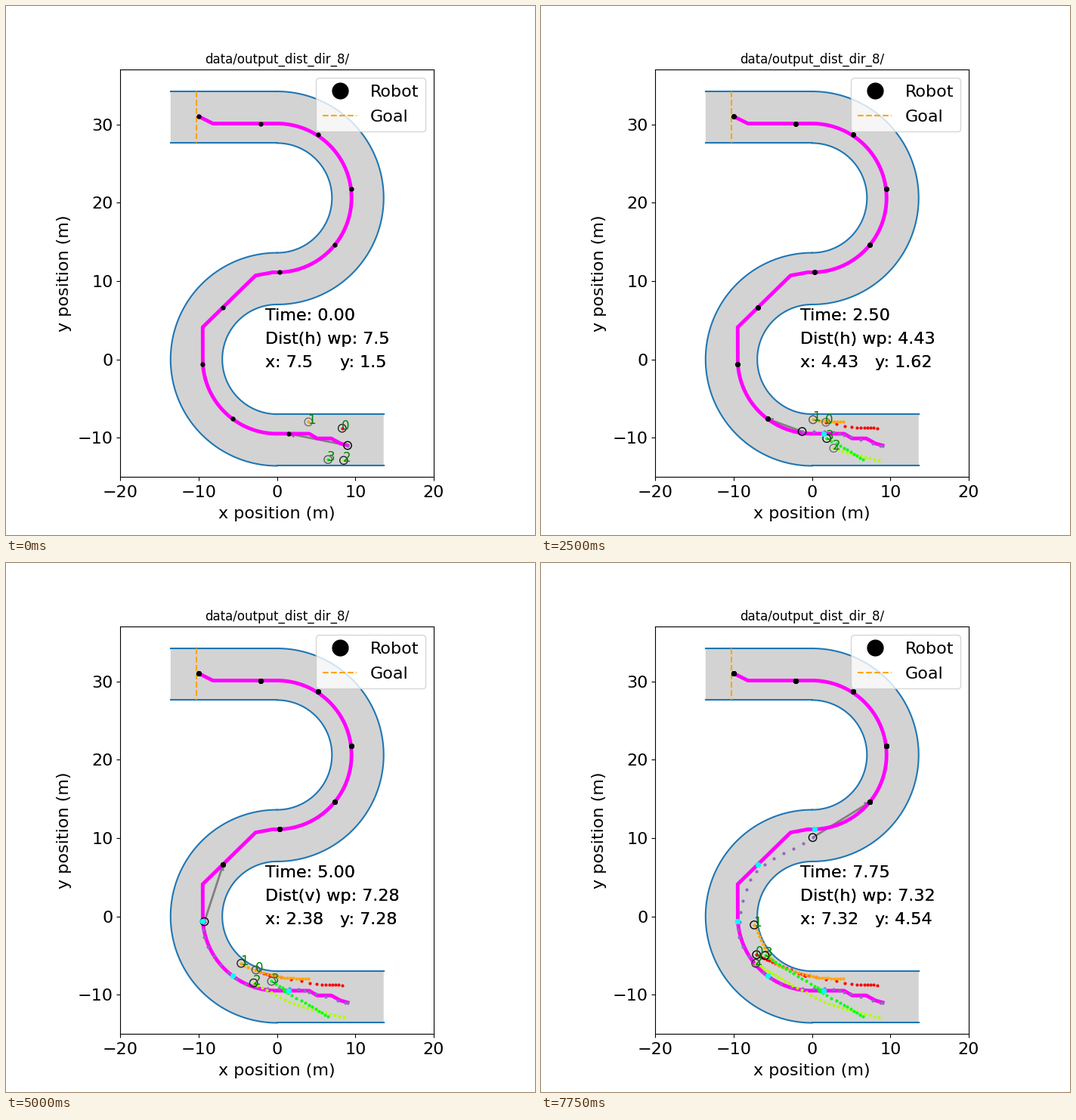
A matplotlib script for the animation above (8 s loop, 700x700 px).

```python
import numpy as np
import matplotlib.pyplot as plt
from matplotlib.animation import FuncAnimation
from matplotlib.lines import Line2D
from matplotlib.patches import Circle, FancyArrow

FRAMES, STEP = 32, 0.25
INNER, OUTER, MID = 7.0, 13.6, 9.5
TOP_Y = INNER + OUTER
SWITCH_DIST = 3.05
FONT = 16

WAYPOINTS = np.array([
    (1.5, -9.5), (-5.7, -7.6), (-9.5, -0.6), (-6.9, 6.6), (0.3, 11.1),
    (7.4, 14.6), (9.5, 21.8), (5.2, 28.7), (-2.1, 30.1), (-10, 31)])

# Key points as (step, x, y); a smooth curve joins them
ROBOT_KEYS = [
    (0, 9, -11), (1, 8.7, -11.05), (4, 4.94, -9.9), (7, 2.68, -9.35),
    (12, -3.99, -8.65), (16, -8.08, -5.08), (18, -9.33, -2.65),
    (20, -9.28, -0.68), (24, -7.84, 4.69), (31, 0.08, 10.06)]
AGENTS = {
    "#ff0000": [(0, 8.3, -8.8), (8, 4.2, -8.5), (12, -0.4, -7.6),
                (16, -1, -7.5), (24, -4.7, -6), (31, -7.1, -4.9)],
    "#ffa500": [(0, 4, -8), (12, -0.75, -7.5), (20, -4.6, -6),
                (31, -7.4, -1.1)],
    "#b0ff00": [(0, 8.5, -12.9), (12, 1.6, -10.9), (20, -3, -8.5),
                (31, -7.2, -6)],
    "#00ff10": [(0, 6.5, -12.8), (7, 3.6, -11.05), (12, 1, -9.6),
                (16, 0.9, -9.3), (24, -2.9, -7), (31, -6, -5)]}


def track(keys):
    """Cubic Hermite curve through the keys, one position per step."""
    keys = np.array(keys)
    t, pos = keys[:, 0], keys[:, 1:]
    slope = np.gradient(pos, t, axis=0)
    steps = np.arange(FRAMES)
    i = np.clip(np.searchsorted(t, steps, side="right") - 1, 0, len(t) - 2)
    span = (t[i + 1] - t[i])[:, None]
    u = (steps - t[i])[:, None] / span
    ease = u * u * (3 - 2 * u)
    return (pos[i] * (1 - ease) + pos[i + 1] * ease
            + span * u * (1 - u) * (slope[i] * (1 - u) - slope[i + 1] * u))


def arc(radius, cy, start, end):
    a = np.radians(np.linspace(start, end, 120))
    return np.column_stack([radius * np.cos(a), cy + radius * np.sin(a)])


def plan_targets(path):
    """Waypoint index before and after the switch check at each step."""
    before, after, index = [], [], 0
    for pos in path:
        before.append(index)
        if np.abs(WAYPOINTS[index] - pos).max() < SWITCH_DIST:
            index += 1
        after.append(index)
    return before, after


robot = track(ROBOT_KEYS)
agents = [track(keys) for keys in AGENTS.values()]
old_target, new_target = plan_targets(robot)
shades = np.random.default_rng(8).uniform(0, 0.45, (FRAMES, len(agents)))

fig, ax = plt.subplots(figsize=(7, 7), dpi=100)
ax.set_aspect("equal")
ax.set_xlim(-20, 20)
ax.set_ylim(-15, 37)
ax.set_xticks(range(-20, 21, 10))
ax.set_yticks(range(-10, 31, 10))
ax.tick_params(labelsize=FONT)
ax.tick_params(axis="x", pad=4.2)
ax.set_xlabel("x position (m)", fontsize=FONT, labelpad=6.2)
ax.set_ylabel("y position (m)", fontsize=FONT, labelpad=5.8)
ax.set_title("data/output_dist_dir_8/", fontsize=12)


def draw_corridor():
    walls = []
    for low, high in ((OUTER, INNER), (INNER, OUTER)):
        parts = [np.array([(OUTER, -low), (0, -low)]),
                 arc(low, 0, 270, 90),
                 arc(high, TOP_Y, -90, 90),
                 np.array([(0, TOP_Y + high), (-OUTER, TOP_Y + high)])]
        for part in parts:
            ax.plot(*part.T, color="#1f77b4", lw=1.5)
        walls.append(np.vstack(parts))
    ax.fill(*np.vstack([walls[0], walls[1][::-1]]).T, color="lightgray",
            lw=0, zorder=0)


def draw_plan():
    points = np.vstack([
        [(9, -11), (8.1, -10.75), (6.9, -10.1), (5.1, -10.1), (4.1, -9.5)],
        arc(MID, 0, 269, 183),
        [(-MID, 4.1), (-2.75, 10.7)],
        arc(MID, TOP_Y, -93, 90),
        [(-8.2, 30.1), (-10, 31)]])
    ax.plot(*points.T, color="magenta", lw=3.5)


draw_corridor()
goal, = ax.plot([-10.3, -10.3], [TOP_Y + OUTER, TOP_Y + INNER], "--",
                color="orange", lw=1.5)
draw_plan()
robot_key = Line2D([], [], ls="", marker="o", color="k", ms=15)
ax.legend([robot_key, goal], ["Robot", "Goal"], loc="upper right",
          fontsize=FONT, handleheight=0.8, labelspacing=0.58).set_zorder(8)


def dots(color, size, z):
    return ax.plot([], [], "o", color=color, ms=size, zorder=z)[0]


def ring():
    return ax.add_patch(Circle((0, 0), 0.5, fill=False, ec="k", lw=1,
                               zorder=3))


def readout(x, y):
    # Doubled for the heavier glyph edges
    return [ax.text(x, y, "", fontsize=FONT) for _ in range(2)]


def write(texts, string):
    for text in texts:
        text.set_text(string)


def short(value):
    return round(float(abs(value)), 2)


arrow = ax.add_patch(FancyArrow(0, 0, 1, 1, width=0.13, head_width=0.6,
                                head_length=0.7, length_includes_head=True,
                                color="gray", zorder=1.5))
robot_trail = dots("tab:purple", 2, 2.5)
agent_trails = [dots(color, 2, 2.5) for color in AGENTS]
robot_ring = ring()
agent_rings = [ring() for _ in agents]
ahead, reached = dots("black", 3.5, 4), dots("cyan", 3.5, 4)
labels = [ax.text(0, 0, str(i), color="green", fontsize=12, zorder=5)
          for i in range(len(agents))]
time_text, dist_text = readout(-1.5, 5), readout(-1.5, 2)
x_text, y_text = readout(-1.5, -1), readout(8, -1)


def update(n):
    pos, index = robot[n], new_target[n]
    dx, dy = WAYPOINTS[index] - pos
    arrow.set_data(x=pos[0], y=pos[1], dx=dx, dy=dy)
    robot_trail.set_data(*robot[:n + 1].T)
    robot_ring.center = pos

    # Repainted once per step, so their edges harden
    ahead.set_data(*np.tile(WAYPOINTS[index:], (n + 1, 1)).T)
    reached.set_data(*np.tile(WAYPOINTS[:index], (n + 1, 1)).T)

    for i, path in enumerate(agents):
        x, y = path[n]
        agent_trails[i].set_data(*path[:n + 1].T)
        agent_rings[i].center = (x, y)
        agent_rings[i].set_edgecolor(str(shades[n, i]))
        labels[i].set_position((x - 0.1, y - 0.2))

    gap = np.abs(WAYPOINTS[old_target[n]] - pos)
    axis = "h" if gap[0] > gap[1] else "v"
    write(time_text, f"Time: {n * STEP:.2f}")
    write(dist_text, f"Dist({axis}) wp: {short(gap.max())}")
    write(x_text, f"x: {short(dx)}")
    write(y_text, f"y: {short(dy)}")
    return []


anim = FuncAnimation(fig, update, frames=FRAMES, interval=250, repeat=True,
                     repeat_delay=0, init_func=lambda: update(0), blit=False)
plt.show()
```
